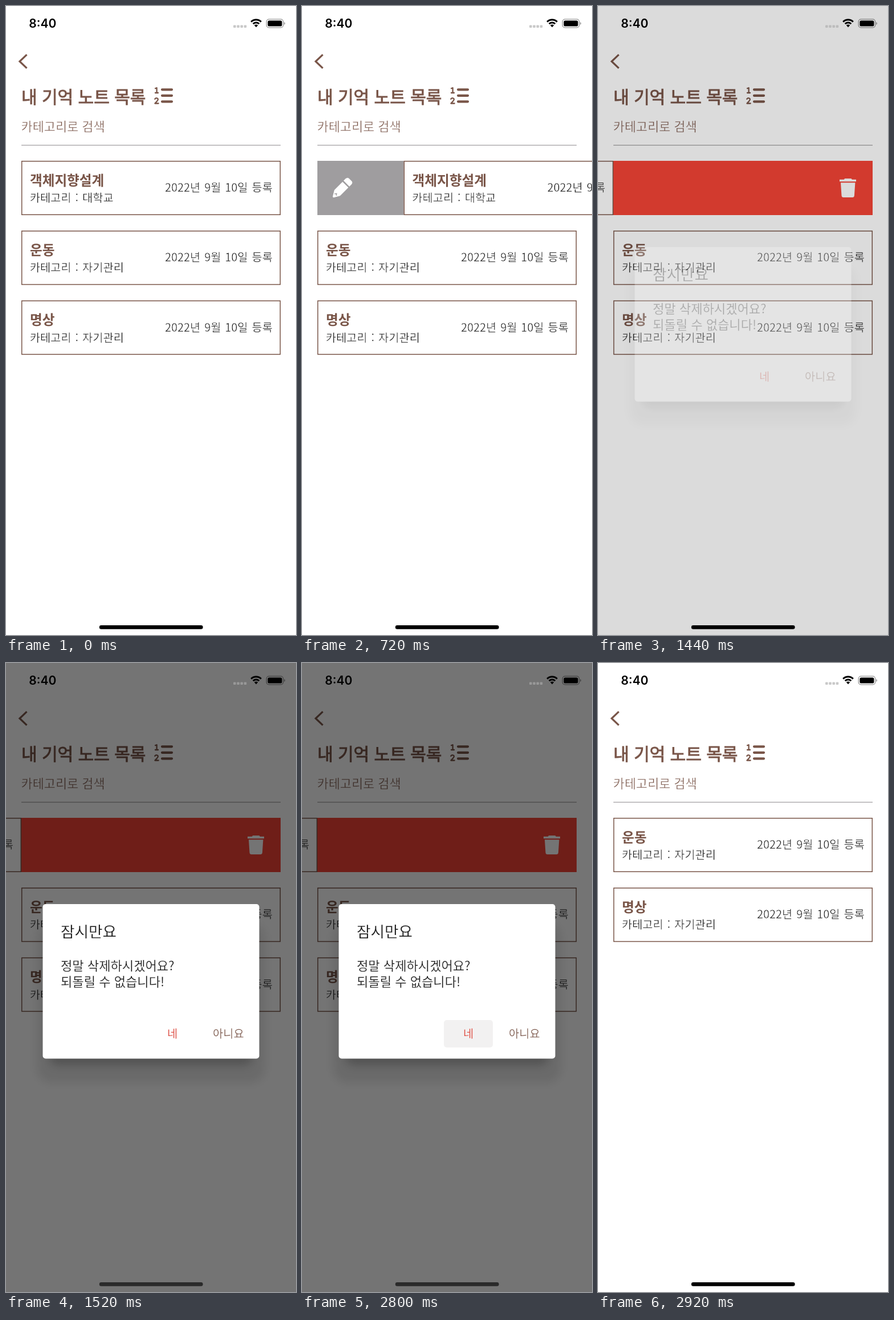
Write an HTML page that moves like this. It is 509 px wide and 1101 px high and loops after 2960 ms.

```html
<!DOCTYPE html>
<html lang="ko">
<head>
<meta charset="utf-8">
<title>Note list</title>
<style>
  html, body { margin: 0; width: 100%; height: 100%; overflow: hidden; background: #fff; }
  svg { display: block; width: 100%; height: 100%; }
  text { font-family: "Noto Sans CJK KR", "Noto Sans KR", "Noto Sans CJK JP", sans-serif; white-space: pre; }
  .clock { font: 600 21px Inter, sans-serif; }
  .head { font-size: 30px; fill: #795548; stroke: #795548; stroke-width: .9; }
  .search { font-size: 21.9px; fill: #795548; }
  .name { font-size: 23.6px; font-weight: 700; fill: #795548; }
  .small { font-size: 19.8px; word-spacing: 1.5px; fill: #111; }
  .ask { font-size: 26.6px; fill: #1c1c1c; }
  .body { font-size: 22.1px; fill: #1c1c1c; }
  .button { font-size: 19.8px; }
  /* A white edge thins the regular weight to a light one */
  .search, .small { stroke: #fff; stroke-width: .5; }
  .ask, .body, .button { stroke: #fff; stroke-width: .25; }
  .line { fill: none; stroke: #795548; stroke-linecap: round; stroke-linejoin: round; }
</style>
</head>
<body>
<svg viewBox="0 0 509 1101">
  <defs>
    <filter id="blur" x="-20%" y="-20%" width="140%" height="140%"><feGaussianBlur stdDeviation="8"/></filter>
    <clipPath id="reveal"><rect id="revealBox" y="271" height="95"/></clipPath>
    <clipPath id="buttonClip"><rect x="249" y="625" width="86" height="48" rx="5"/></clipPath>
  </defs>
  <rect width="509" height="1101" fill="#fff"/>

  <path class="line" d="M36.5 85.2 24 97l12.5 11.8" stroke-width="3.2" style="stroke-linecap:butt;stroke-linejoin:miter"/>
  <text class="head" x="27" y="169.5">내 기억 노트 목록</text>
  <path class="line" d="M274 146.3h17M274 156.8h17M274 167.3h17" stroke-width="4.2"/>
  <path class="line" d="M262 144.2l2.6-1v8.8M262 152h5M261.3 162.8q1.4-2 3.6-1.5 2.7.8 1.6 3.2-.8 1.6-5.1 6h6.2" stroke-width="2.3"/>
  <text class="search" x="26.5" y="218.6">카테고리로 검색</text>
  <path d="M27 243.6H482" stroke="#a3a0a2" stroke-width="1.4"/>

  <g id="back" clip-path="url(#reveal)">
    <rect id="backFill" x="27" y="271" width="455" height="95"/>
    <g id="pencil" fill="#fff" transform="translate(54 335) rotate(-45)">
      <path d="M1 1.2Q0 0 1 -1.2L10.5 -6.8Q11.2 -7.2 12 -7.2H31.5V7.2H12Q11.2 7.2 10.5 6.8Z"/>
      <path d="M34 -7.2H39Q43.5 -7.2 43.5 -3V3Q43.5 7.2 39 7.2H34Z"/>
      <path d="M6.5 -2.2 9.5 0 6.5 2.2" fill="none" stroke="#9f9d9f" stroke-width="1.4"/>
    </g>
    <path id="trash" fill="#fff" d="M424 303.8h7.6l1.6-1.8h11.2l1.6 1.8h7v3.4h-29zM426 309.2h25.4l-1.5 22.6q-.3 3.2-3.3 3.2h-15.8q-3 0-3.3-3.2z"/>
  </g>
  <g id="cards"></g>

  <rect id="barrier" width="509" height="1101"/>
  <rect id="home" x="163.8" y="1084.1" width="181.8" height="6.6" rx="3.3"/>

  <text class="clock" x="40.3" y="38">8:40</text>
  <g id="dots"></g>
  <g fill="none" stroke="#000" stroke-width="3">
    <path d="M430.2 27.7A12.5 12.5 0 0 1 447.8 27.7M433.7 31.2A7.5 7.5 0 0 1 444.3 31.2"/>
    <path d="M439 37.2l-3.2-3.4a4.6 4.6 0 0 1 6.4 0z" fill="#000" stroke="none"/>
  </g>
  <rect x="457.2" y="23.2" width="29.4" height="14.6" rx="4.4" fill="none" stroke="#000" stroke-opacity=".42" stroke-width="1.3"/>
  <rect x="459.4" y="25.4" width="25" height="10.2" rx="2.6"/>
  <path d="M488.2 28v5q1.7-.8 1.7-2.5t-1.7-2.5" fill-opacity=".42"/>

  <g id="dialog">
    <g filter="url(#blur)">
      <rect x="54" y="455" width="401" height="280" rx="26" opacity=".09"/>
      <rect x="76" y="460" width="357" height="244" rx="16" opacity=".22"/>
    </g>
    <rect x="64.5" y="422" width="380" height="270.5" rx="5" fill="#fff"/>
    <text class="ask" x="96" y="480">잠시만요</text>
    <text class="body" x="96" y="537.7">정말 삭제하시겠어요?</text>
    <text class="body" x="96" y="566.3">되돌릴 수 없습니다!</text>
    <circle id="ripple" cx="286" cy="652" fill="#402c34" fill-opacity=".065" clip-path="url(#buttonClip)"/>
    <text class="button" x="283" y="655.5" fill="#dc4a3f">네</text>
    <text class="button" x="363" y="655.5" fill="#795548">아니요</text>
  </g>
</svg>
<script>
const LOOP = 2960, STEP = 40, ROW = 122.2, WIDTH = 455, LEFT = 27;
const PEEK = 151.6;
const notes = [["객체지향설계", "대학교"], ["운동", "자기관리"], ["명상", "자기관리"]];
const el = id => document.getElementById(id);
const set = (id, attrs) => {
  for (const key in attrs) el(id).setAttribute(key, attrs[key]);
};

el("cards").innerHTML = notes.map(([name, group], i) => `
  <g id="card${i}">
    <rect id="face${i}" x="27.7" y="271.7" width="453.6" height="93.6" fill="#fff" stroke="#795548" stroke-width="1.5"/>
    <text class="name" x="42" y="313.5">${name}</text>
    <text class="small" x="41.7" y="343.2">카테고리 : ${group}</text>
    <text class="small" x="279" y="325.3">2022년 9월 10일 등록</text>
  </g>`).join("");

el("dots").innerHTML = [0, 1, 2, 3].map(i =>
  `<rect x="${399 + i * 6.2}" y="33.4" width="4.6" height="4.6" rx="1.2"/>`).join("");

// Smooth progress from 0 to 1 between two times
function ease(t, from, to) {
  const u = Math.min(1, Math.max(0, (t - from) / (to - from)));
  return u * u * (3 - 2 * u);
}

const gray = v => `rgb(${v},${v},${v})`;

function draw(time) {
  const t = Math.floor(time % LOOP / STEP) * STEP;
  const removed = t >= 2820;
  const dx = PEEK * (ease(t, 320, 480) - ease(t, 720, 880)) - WIDTH * ease(t, 1200, 1400);
  const fade = ease(t, 1400, 1520) - ease(t, 2820, 2920);

  notes.forEach((_, i) => {
    const x = i ? 0 : dx;
    const y = ROW * (removed ? i - 1 : i);
    set("card" + i, {
      transform: `translate(${x} ${y})`,
      visibility: removed && !i ? "hidden" : "visible"
    });
  });
  set("face0", { fill: t >= 1200 && t < 1280 ? "#f9f6fa" : "#fff" });

  const editing = dx > 0;
  set("back", { visibility: removed || !dx ? "hidden" : "inherit" });
  set("revealBox", { x: editing ? LEFT : LEFT + WIDTH + dx, width: Math.abs(dx) });
  set("backFill", { fill: editing ? "#9f9d9f" : "#f44336" });
  set("pencil", { opacity: editing ? 1 : 0 });
  set("trash", { opacity: editing ? 0 : 1 });

  set("dots", { fill: gray(Math.round(201 - 49 * fade)) });
  set("barrier", { "fill-opacity": 0.545 * fade });
  set("home", { fill: gray(Math.round(42 * ease(fade, 0.4, 1))) });

  set("dialog", { opacity: fade });
  set("ripple", { r: t < 2680 ? 0 : 16 + 50 * ease(t, 2680, 2820) });
}

function frame() {
  draw(performance.now());
  requestAnimationFrame(frame);
}
frame();
</script>
</body>
</html>
```
